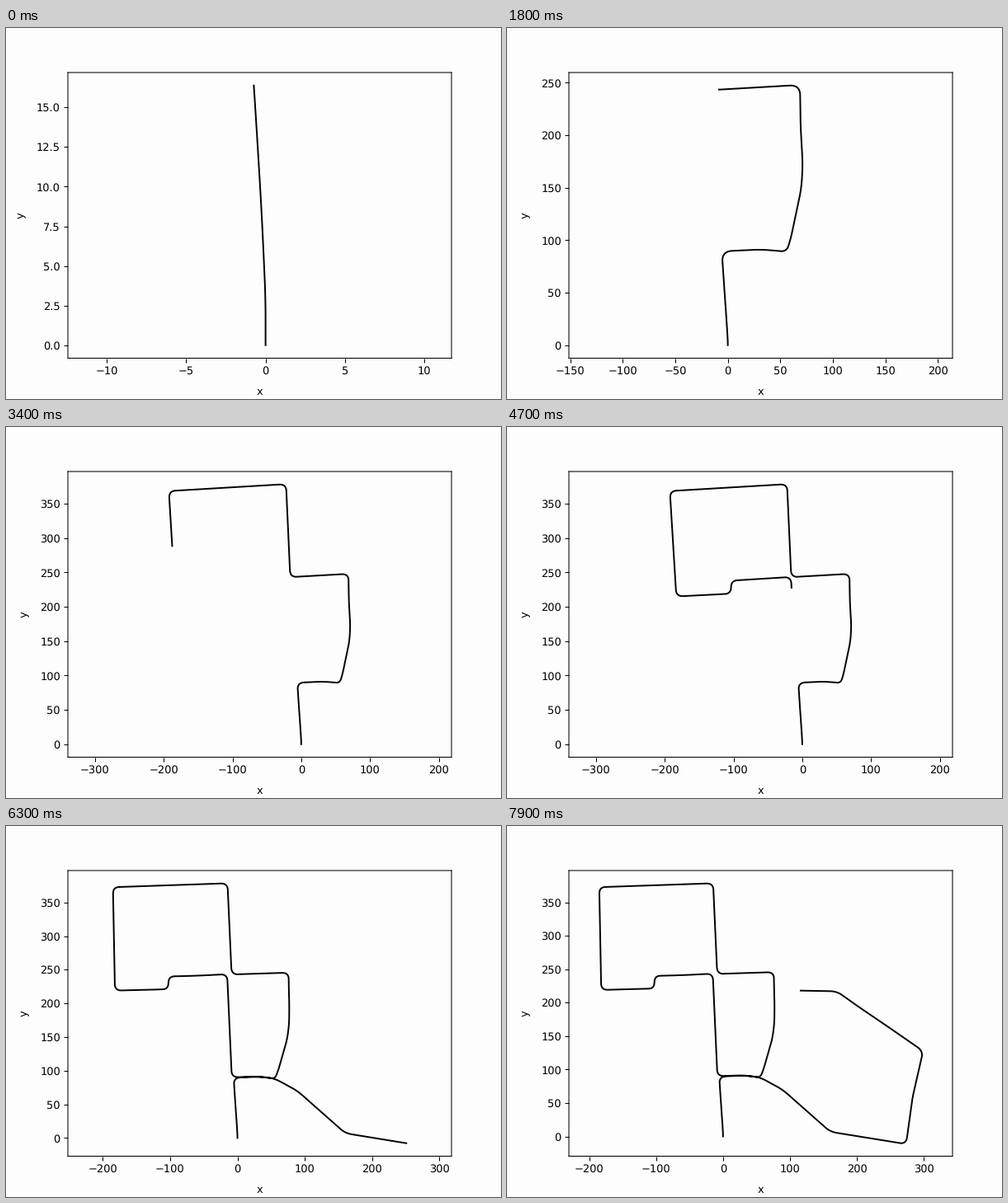
Write a matplotlib script that moves like this. It is 600 px wide and 450 px high and loops after 8000 ms.

```python
import numpy as np
import matplotlib.pyplot as plt
from matplotlib.animation import FuncAnimation

plt.rcParams.update({"path.snap": False, "text.hinting": "none"})

FRAMES, STEP = 80, 100
CLOSURE_MS = 5300   # the loop closes and the whole route is corrected
CUT = 10            # distance from a corner at which rounding starts
PAPER = "#fdfdfd"

# Street corners and bends along the drive.
corners = np.array([
    (0, 0), (0, 3), (-.25, 8.5), (-.73, 16.35), (-5.8, 89.4), (32, 91.3),
    (56, 89), (60, 102), (70, 149), (71.4, 172), (69.3, 207), (68.8, 248),
    (-16, 243), (-22, 378.5), (-192.5, 368.5), (-183.2, 215), (-104, 219),
    (-103, 238), (-16.3, 243.5), (-9.5, 90), (30, 91.5), (54, 88.5), (88, 70),
    (159, 7), (272.5, -11.5), (282, 58), (298, 127.5), (253.5, 158.5),
    (204, 192), (169, 217), (115, 218),
])

# Distance driven at a few moments, with steady speed between them.
times = [0, 1800, 2700, 3600, 4500, 4700, 5800, 7900]
driven = [16.4, 380, 590, 812, 1001, 1024, 1331, 1816]


def rounded(pts):
    """Polyline through pts with every corner replaced by a small curve."""
    u = np.linspace(0, 1, 16)[:, None]
    parts = [pts[:1]]
    for a, p, b in zip(pts, pts[1:], pts[2:]):
        la, lb = np.hypot(*(a - p)), np.hypot(*(b - p))
        cut = min(CUT, 0.45 * la, 0.45 * lb)
        start, stop = p + (a - p) * cut / la, p + (b - p) * cut / lb
        parts.append((1 - u)**2 * start + 2 * u * (1 - u) * p + u**2 * stop)
    return np.vstack(parts + [pts[-1:]])


def ramp(s, a, b):
    return np.clip((s - a) / (b - a), 0, 1)


path = rounded(corners)
arc = np.r_[0, np.cumsum(np.hypot(*np.diff(path, axis=0).T))]


def route(ms):
    """The part of the route driven so far."""
    end = np.interp(ms, times, driven)
    s = np.r_[np.arange(0, end, 0.5), end]
    x, y = (np.interp(s, arc, c) for c in path.T)
    if ms >= CLOSURE_MS:
        # a slight turn plus a sideways shift of the loop
        y = y - (0.6 + 0.025 * x) * (ramp(s, 100, 200) - ramp(s, 930, 1010))
        x = x + 7.3 * ramp(s, 150, 260) - 6.3 * ramp(s, 690, 840)
    return np.column_stack([x, y])


fig = plt.figure(figsize=(6.4, 4.8), dpi=93.75, facecolor=PAPER)
ax = fig.add_subplot(facecolor=PAPER)
ax.set_xlabel("x", labelpad=10)
ax.set_ylabel("y", labelpad=10)
line, = ax.plot([], [], color="black", lw=1.5)
box = np.array([0.775 * 600, 0.77 * 450])


def update(n):
    pts = route(n * STEP)
    line.set_data(*pts.T)
    lo, hi = pts.min(axis=0), pts.max(axis=0)
    half = box * np.max((hi - lo) * 1.1 / box) / 2   # equal units, 5% margins
    mid = (lo + hi) / 2
    ax.set_xlim(mid[0] - half[0], mid[0] + half[0])
    ax.set_ylim(mid[1] - half[1], mid[1] + half[1])
    return line,


anim = FuncAnimation(fig, update, frames=FRAMES, interval=STEP, repeat=True)
plt.show()
```
